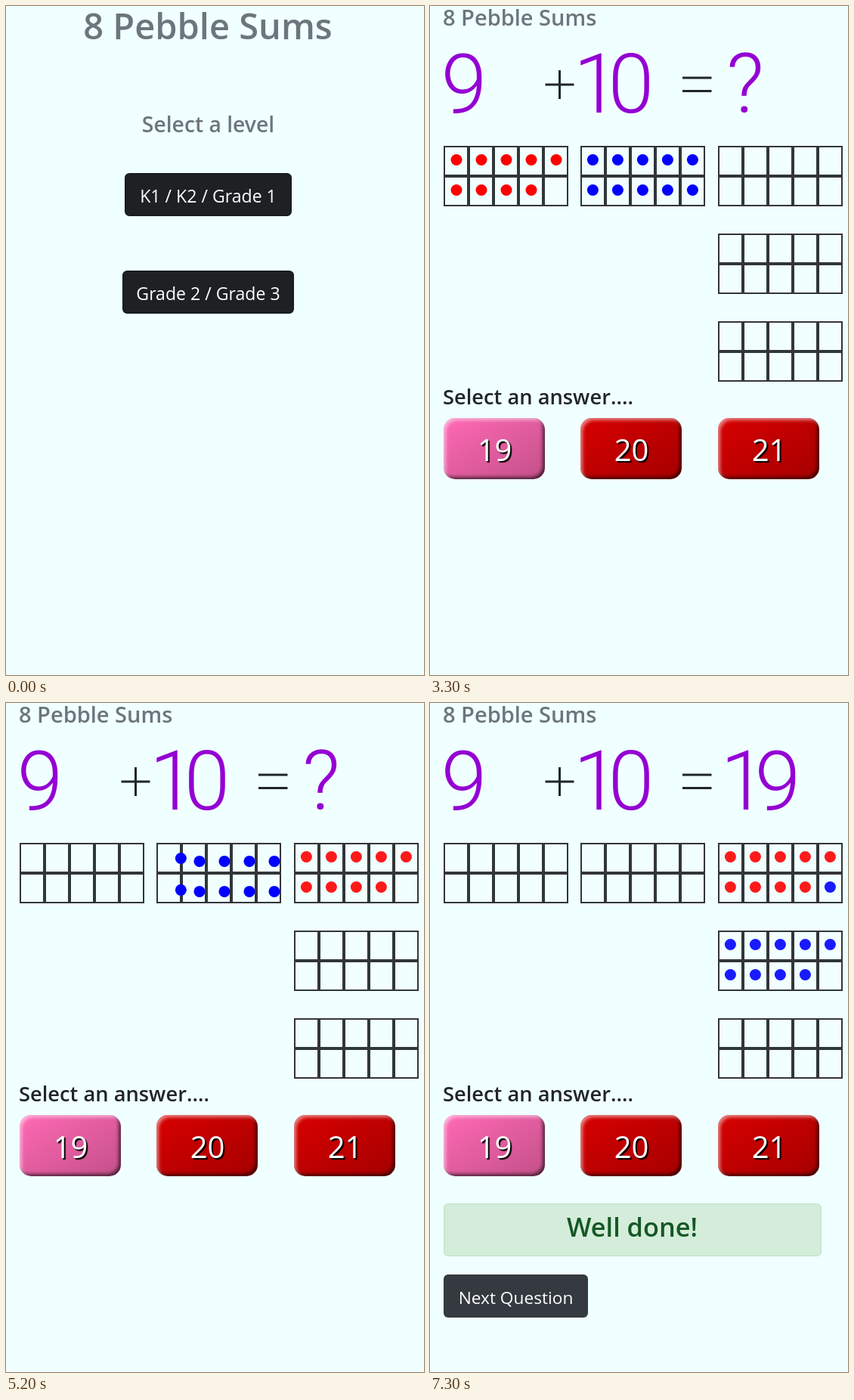
An HTML page for the animation above (8000 ms loop, 553 by 885 pixels).

```html
<!DOCTYPE html>
<html lang="en">
<head>
<meta charset="utf-8">
<title>8 Pebble Sums</title>
<style>
  html, body { margin: 0; width: 100%; height: 100%; overflow: hidden; background: #f0ffff; }
  #stage { position: relative; width: 553px; height: 885px; overflow: hidden;
    background: #f0ffff; font-family: "Open Sans", "Noto Sans", sans-serif; }
  #stage > svg { position: absolute; left: 0; top: 0; display: block; }
  text { white-space: pre; }
  .title { font-weight: 600; fill: #6c757d; }
  .mid { text-anchor: middle; }
  .btn { font-size: 23.1px; fill: #fff; }
  .big { font: 300 109px Roboto, "Open Sans", sans-serif; fill: #9400d3; text-anchor: middle; }
  .cell { fill: #f0ffff; fill-opacity: .1; stroke: #212529; stroke-opacity: .92; stroke-width: 2; }
  #quiz { position: absolute; left: 0; top: 0; }
  .ans { position: absolute; top: 545px; width: 134px; height: 81px; line-height: 83px;
    border-radius: 15px; text-align: center; text-indent: 1px; font-size: 40px; color: #fff;
    text-shadow: 2px 2px 1px #000; background-color: #d80000;
    background-image: linear-gradient(to bottom right, rgba(0,0,0,0), rgba(0,0,0,.24));
    box-shadow: inset 3px 3px 4.5px rgba(255,255,255,.5), inset -3px -3px 4.5px rgba(0,0,0,.6); }
  .ans.picked { background-color: #ff69b4; }
</style>
</head>
<body>
<div id="stage">
  <svg id="home" width="553" height="885">
    <text class="title mid" x="267" y="44" font-size="47">8 Pebble Sums</text>
    <text class="title mid" x="267.5" y="167" font-size="28.3">Select a level</text>
    <g fill="#1d2124" stroke="#171a1d" stroke-width="1.5">
      <rect x="157.75" y="221.75" width="219.5" height="55.5" rx="5.5"/>
      <rect x="154.75" y="350.75" width="225.5" height="55.5" rx="5.5"/>
    </g>
    <text class="btn mid" x="267.5" y="260">K1 / K2 / Grade 1</text>
    <text class="btn mid" x="267.5" y="389">Grade 2 / Grade 3</text>
  </svg>

  <svg id="game" width="553" height="885">
    <text class="title" x="17" y="26" font-size="29">8 Pebble Sums</text>
    <text class="big" x="45" y="141">9</text>
    <text class="big" x="220 266" y="141">10</text>
    <text class="big" id="ask" x="417" y="141">?</text>
    <text class="big" id="sum" x="414.5 460" y="141">19</text>
    <path d="M152.5 104H190.5M171.5 85V123M334 95H372.5M334 112.5H372.5"
      stroke="#212529" stroke-width="3"/>
    <g id="board"></g>
    <g id="praise">
      <rect x="18.75" y="662.75" width="498.5" height="68.5" rx="5.5"
        fill="#d4edda" stroke="#c3e6cb" stroke-width="1.5"/>
      <text class="mid" x="267.5" y="706" font-size="34.3" font-weight="600" fill="#155724">Well done!</text>
      <rect x="18" y="756" width="191" height="57" rx="6" fill="#343a40"/>
      <text class="btn mid" x="113.5" y="795" style="font-size:22.7px">Next Question</text>
    </g>
  </svg>

  <div id="quiz">
    <svg width="553" height="640" style="display:block">
      <text x="17" y="527" font-size="27.3" font-weight="600" fill="#212529">Select an answer....</text>
    </svg>
    <div class="ans" id="first" style="left:18px">19</div>
    <div class="ans" style="left:199px">20</div>
    <div class="ans" style="left:381px">21</div>
  </div>
</div>

<script>
const LOOP = 8000, STEP = 100;
const OPEN = 1000, PICK = 3297, SECOND = 5108, MOVE = 1810, DONE = 6900, FADE = 400;
const $ = id => document.getElementById(id);
const board = $('board');

function add(parent, tag, attrs) {
  const el = document.createElementNS('http://www.w3.org/2000/svg', tag);
  for (const k in attrs) el.setAttribute(k, attrs[k]);
  return parent.appendChild(el);
}

// A ten-cell frame that clips to its own height
function grid(x, y) {
  const box = add(board, 'svg', { x, y, width: 165, height: 80, overflow: 'hidden' });
  for (let i = 0; i < 10; i++)
    add(box, 'rect', { class: 'cell', x: i % 5 * 33 + 1, y: (i / 5 | 0) * 40 + 1, width: 31, height: 38 });
  return box;
}

const slot = (x, y, i) => [x + 16.4 + i % 5 * 33, y + 18.5 + (i / 5 | 0) * 40];

function dot(fill, from, to) {
  return { el: add(board, 'circle', { r: 7.5, fill }), from, to };
}

// Second addend: its first column fills the gap and the end of the next row
function blueGoal(i) {
  if (i === 0) return slot(381, 185, 9);
  if (i === 5) return slot(381, 301, 4);
  return slot(381, 301, i - 1);
}

const range = n => [...Array(n).keys()];
grid(18, 185);
const reds = range(9).map(i => dot('#f00', slot(18, 185, i), slot(381, 185, i)));
grid(199, 185);
const blues = range(10).map(i => dot('#00f', slot(199, 185, i), blueGoal(i)));
grid(381, 185);
const extra = [grid(381, 301), grid(381, 417)];

const part = (t, start, length) => Math.min(1, Math.max(0, (t - start) / length));
const swing = p => .5 - Math.cos(p * Math.PI) / 2;
const show = (el, on) => { el.style.display = on ? '' : 'none'; };

function place(dots, p) {
  for (const { el, from, to } of dots) {
    el.setAttribute('cx', from[0] + (to[0] - from[0]) * p);
    el.setAttribute('cy', from[1] + (to[1] - from[1]) * p);
  }
}

function draw(t) {
  const playing = t >= OPEN, done = t >= DONE;
  show($('home'), !playing);
  show($('game'), playing);
  show($('quiz'), playing);

  const grown = 80 * swing(part(t, OPEN, FADE));
  extra.forEach(box => box.setAttribute('height', grown));
  extra[1].setAttribute('y', 337 + grown);
  $('quiz').style.transform = `translateY(${2 * grown - 160}px)`;

  $('first').classList.toggle('picked', t >= PICK);
  place(reds, part(t, PICK, MOVE));
  place(blues, done ? 1 : part(t, SECOND, MOVE));

  show($('ask'), !done);
  show($('sum'), done);
  $('praise').style.opacity = swing(part(t, DONE, FADE));
}

const start = performance.now();
function tick() {
  const t = (performance.now() - start) % LOOP;
  draw(Math.floor(t / STEP) * STEP);
  requestAnimationFrame(tick);
}
tick();
</script>
</body>
</html>
```
